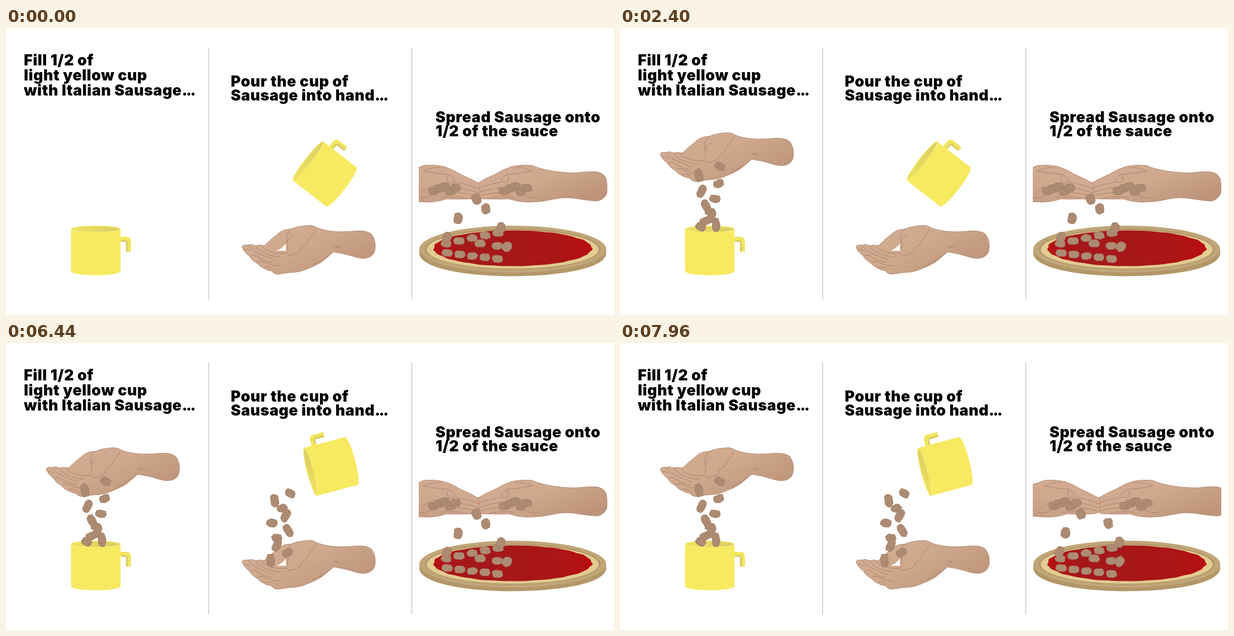
These frames come from a looping animation (1090x514 px, 8000 ms). An HTML page:

```html
<!DOCTYPE html>
<html lang="en">
<head>
<meta charset="utf-8">
<title>Sausage steps</title>
<style>
html, body { margin: 0; width: 100%; height: 100%; overflow: hidden; background: #fff; }
svg { display: block; width: 100vw; height: 100vh; }
text { font: 900 26.8px Inter, "Open Sans", sans-serif; letter-spacing: .6px; fill: #000; }
.dots { letter-spacing: -2.5px; }
.skin { fill: url(#skin); stroke: #b58d75; stroke-width: 1; stroke-linejoin: round; }
.crease { fill: none; stroke: #a9816a; stroke-width: .9; stroke-linecap: round; }
.meat { fill: #ad8b72; stroke: #a5826a; stroke-width: 1.2; stroke-linejoin: round; }
.rule { stroke: #b8b8b8; stroke-width: 1; }
</style>
</head>
<body>
<svg id="stage" viewBox="0 0 1090 514">
  <defs>
    <linearGradient id="skin" x1="0" y1="0" x2="1" y2=".7">
      <stop offset="0" stop-color="#d4ae95"/>
      <stop offset=".5" stop-color="#cfa88d"/>
      <stop offset="1" stop-color="#bd947a"/>
    </linearGradient>
    <linearGradient id="sauce">
      <stop offset="0" stop-color="#b91013"/>
      <stop offset=".2" stop-color="#a5181a"/>
      <stop offset=".75" stop-color="#a91617"/>
      <stop offset="1" stop-color="#b80e11"/>
    </linearGradient>
    <linearGradient id="inside">
      <stop offset="0" stop-color="#efe25f"/>
      <stop offset="1" stop-color="#dacd66"/>
    </linearGradient>
    <clipPath id="panel"><rect x="740" y="230" width="338" height="240"/></clipPath>

    <g id="palm">
      <path class="skin" d="M423 392Q425 387 434 389Q440 386 447 390Q454 387 463 390Q474 379 487 369Q496 360 511 360
        Q524 354 546 353.500Q553 354 558 358Q574 364 597 365Q614 365 628 363.500Q646 362 655 369Q663 379 662 394
        Q661 407 650 411Q641 414 629 411Q608 404 587 401Q576 411 566 419Q553 427 536 433Q524 438 507 438
        Q497 440 486 441Q479 440 476 435Q467 434 462 430Q455 428 450 421Q441 417 437 409Q427 402 423 392Z"/>
      <path class="crease" d="M434 389Q440 399 455 405T480 415M447 390Q453 400 468 405T492 410M463 390Q457 394 468 398
        Q484 406 505 403M426 397Q432 395 438 399M437 409Q443 404 450 409Q462 418 477 420M450 421Q455 416 463 419
        Q476 426 490 426M462 430Q466 425 476 430M511 360Q502 368 503 378Q508 386 503 399
        M516 371Q505 376 502 386M556 360Q544 376 538 388Q529 391 528 399Q520 407 505 407M587 401Q573 414 550 424
        M587 391L599 393M591 394L595 389"/>
    </g>
    <g id="side">
      <path class="skin" d="M845 278Q858 270 877 262Q891 253 907 248Q924 244 943 246Q956 252 974 255Q993 259 1022 259.500
        Q1042 257 1057 257.500Q1072 259 1076 270Q1079 283 1077 296Q1073 307 1060 310Q1043 309 1026 306
        Q1003 302 985 306Q961 312 935 312Q916 311 902 306Q885 307 864 306Q850 307 844 302Q841 299 844 296
        Q840 291 845 288Q840 282 845 278Z"/>
      <path class="crease" d="M943 256Q920 261 900 262Q889 266 888 273Q892 279 899 276Q904 270 899 263
        M845 288Q866 279 889 276M844 296Q866 287 895 285M848 301Q874 293 902 295M864 306Q884 300 912 303
        M905 281Q928 278 944 292M912 250Q930 248 944 257M930 300Q942 306 955 303"/>
    </g>
    <g id="cupBack">
      <path d="M42-19.500H55Q58.500-19.500 58.500-16V2.500" fill="none" stroke="#f2e55f" stroke-width="9"/>
      <path d="M46-16.500H53Q55.800-16.500 55.800-13V2.500" fill="none" stroke="#d8ca62" stroke-width="3"/>
      <ellipse cy="-38" rx="44.300" ry="6" fill="#f1e45e"/>
      <ellipse cy="-37.500" rx="42" ry="4.600" fill="url(#inside)"/>
    </g>
    <path id="cupFront" fill="#f7ea60" d="M-44.300-38C-44.300-30 44.300-30 44.300-38V37C44.300 47.500-44.300 47.500-44.300 37Z"/>
  </defs>

  <rect width="1090" height="514" fill="#fff"/>
  <path class="rule" d="M363.500 35V486M727.500 35V486"/>
  <text x="32" y="67">Fill 1/2 of</text>
  <text x="32" y="94">light yellow cup</text>
  <text x="32" y="121">with Italian Sausage<tspan class="dots">...</tspan></text>
  <text x="403" y="105">Pour the cup of</text>
  <text x="403" y="129.500">Sausage into hand<tspan class="dots">...</tspan></text>
  <text x="770" y="169">Spread Sausage onto</text>
  <text x="770" y="193.500">1/2 of the sauce</text>

  <use href="#cupBack" x="161" y="398"/>
  <g id="fill"><use id="fillHand" href="#palm"/><g id="fillMeat"></g></g>
  <use href="#cupFront" x="161" y="398"/>

  <use href="#palm"/>
  <path d="M485 399Q495 395 502 386Q501 394 503 399Z" fill="#fff"/>
  <g id="pourMeat"></g>
  <g id="pourCup"><use href="#cupBack"/><use href="#cupFront"/></g>

  <g clip-path="url(#panel)">
    <path d="M741 395V404C745 458 1072 458 1076 404V395Z" fill="#b39768"/>
    <ellipse cx="908.500" cy="396" rx="167.500" ry="42" fill="#c0a678"/>
    <ellipse cx="908.500" cy="396" rx="158" ry="37" fill="#b69a6c"/>
    <ellipse cx="908.500" cy="396.500" rx="154" ry="34.500" fill="#e2cc91"/>
    <path id="sauceShape" fill="url(#sauce)"/>
    <path d="M975 382Q1005 385 1010 395M935 409Q985 415 1018 402M955 377Q990 375 1014 381"
      fill="none" stroke="#b5272a" stroke-width="1" opacity=".6"/>
    <g id="topping"></g>
    <g id="hands">
      <use href="#side"/>
      <use href="#side" transform="translate(1692) scale(-1 1)"/>
      <g id="piles"></g>
    </g>
    <g id="drops"></g>
  </g>
</svg>
<script>
const LOOP = 8000;
const $ = id => document.getElementById(id);
const clamp = v => Math.min(1, Math.max(0, v));
const mix = (a, b, k) => a + (b - a) * k;
const span = (t, start, length) => clamp((t - start) / length);
const easeOut = k => 1 - (1 - k) ** 3;
const easeInOut = k => k * k * (3 - 2 * k);
const times = (n, make) => Array.from({ length: n }, (_, i) => make(i));

let seed = 7;
const rnd = () => (seed = (seed * 16807) % 2147483647) / 2147483647;

// Closed outline around a centre; radius(angle) scales rx and ry.
function ring(n, cx, cy, rx, ry, radius, power = 1) {
  const bend = v => Math.sign(v) * Math.abs(v) ** power;
  const points = times(n, i => {
    const a = i / n * Math.PI * 2, r = radius(a);
    return (cx + bend(Math.cos(a)) * r * rx).toFixed(1) + ' ' + (cy + bend(Math.sin(a)) * r * ry).toFixed(1);
  });
  return 'M' + points.join('L') + 'Z';
}

const place = (el, x, y, angle = 0) =>
  el.setAttribute('transform', `translate(${x.toFixed(2)} ${y.toFixed(2)}) rotate(${angle.toFixed(2)})`);

// Rough, slightly boxy piece of sausage.
function addMeat(parent, w, h, x = 0, y = 0) {
  const el = document.createElementNS('http://www.w3.org/2000/svg', 'path');
  el.setAttribute('class', 'meat');
  el.setAttribute('d', ring(18, 0, 0, w / 2, h / 2, () => 0.87 + rnd() * 0.18, 0.75));
  place(el, x, y);
  $(parent).append(el);
  return el;
}

// A zigzag column of pieces, alternately flat and tall.
const stream = (parent, n, pose) => times(n, i => ({
  el: i % 2 ? addMeat(parent, 14, 24) : addMeat(parent, 19, 14),
  angle: 30 * Math.cos(i * 1.9),
  ...pose(i, i / (n - 1))
}));

const filled = stream('fillMeat', 11, (i, k) => ({
  x: 160 + 19 * Math.cos(i * 0.92 * Math.PI),
  y: 248 + 108 * (1 - (1 - k) ** 1.5),
  pileX: 154 + 21 * Math.sqrt(k) * Math.cos(i * 2.4),
  pileY: 234 + 9 * Math.sqrt(k) * Math.sin(i * 2.4)
}));

const poured = stream('pourMeat', 10, (i, k) => ({
  x: 494 - 4 * k + 16 * Math.cos(i * 2.417),
  y: 269 + 120 * k
}));

const row = (n, x, y, dx, dy) =>
  times(n, i => addMeat('topping', 19, 13, x + dx * i, y + dy * i));
row(5, 789, 386, 23.3, -4.8);
row(5, 791, 403, 22.5, 2.6);
row(2, 850, 386, 31, 4);

const pile = x =>
  times(5, i => addMeat('piles', 19, 14, x + 10 * i, 288 + 5 * Math.sin(i * 2.2 + 1)));
pile(766);
pile(893);

const drops = times(15, i => ({ el: addMeat('drops', 19, 16), x: 843 + 55 * Math.cos(i * 0.9 * Math.PI) }));

$('sauceShape').setAttribute('d', ring(90, 908.5, 394.5, 142, 32,
  a => 1 + 0.007 * Math.sin(a * 23) + 0.005 * Math.sin(a * 13 + 1)));

function drawFill(t) {
  const enter = t < 560 ? 0 : easeOut(span(t, 520, 780));
  $('fill').setAttribute('opacity', enter);
  place($('fill'), 24 * (1 - enter), 8 * (1 - enter));
  place($('fillHand'), -351, -167 + easeInOut(span(t, 1360, 840)));
  const k = easeOut(span(t, 1380, 1020));
  for (const p of filled)
    place(p.el, mix(p.pileX, p.x, k), mix(p.pileY, p.y, k), mix(60, p.angle, k));
}

function drawPour(t) {
  const tilt = easeInOut(span(t, 4200, 840));
  place($('pourCup'), mix(571.5, 582.5, tilt), mix(261.5, 221, tilt), mix(-52.3, -105, tilt));
  const k = easeOut(span(t, 4560, 1000));
  $('pourMeat').setAttribute('visibility', k > 0 ? 'visible' : 'hidden');
  for (const p of poured)
    place(p.el, mix(558, p.x, k), mix(260, p.y, k), p.angle + 70 * (1 - k));
}

// Pieces leave the swaying hands one after another at a steady speed.
function drawSpread(t) {
  const elapsed = Math.max(0, t - 6440);
  place($('hands'), 21 * Math.sin(elapsed / 2080 * Math.PI) ** 2, 0);
  drops.forEach(({ el, x }, i) => {
    const y = 392 + elapsed * 0.1 - 17 * i;
    el.setAttribute('visibility', y > 301 && y < 405 ? 'visible' : 'hidden');
    place(el, x, y, y * 0.8);
  });
}

function draw(t) {
  drawFill(t);
  drawPour(t);
  drawSpread(t);
}

const begin = performance.now();
function tick() {
  draw((performance.now() - begin) % LOOP);
  requestAnimationFrame(tick);
}
draw(0);
requestAnimationFrame(tick);
</script>
</body>
</html>
```
